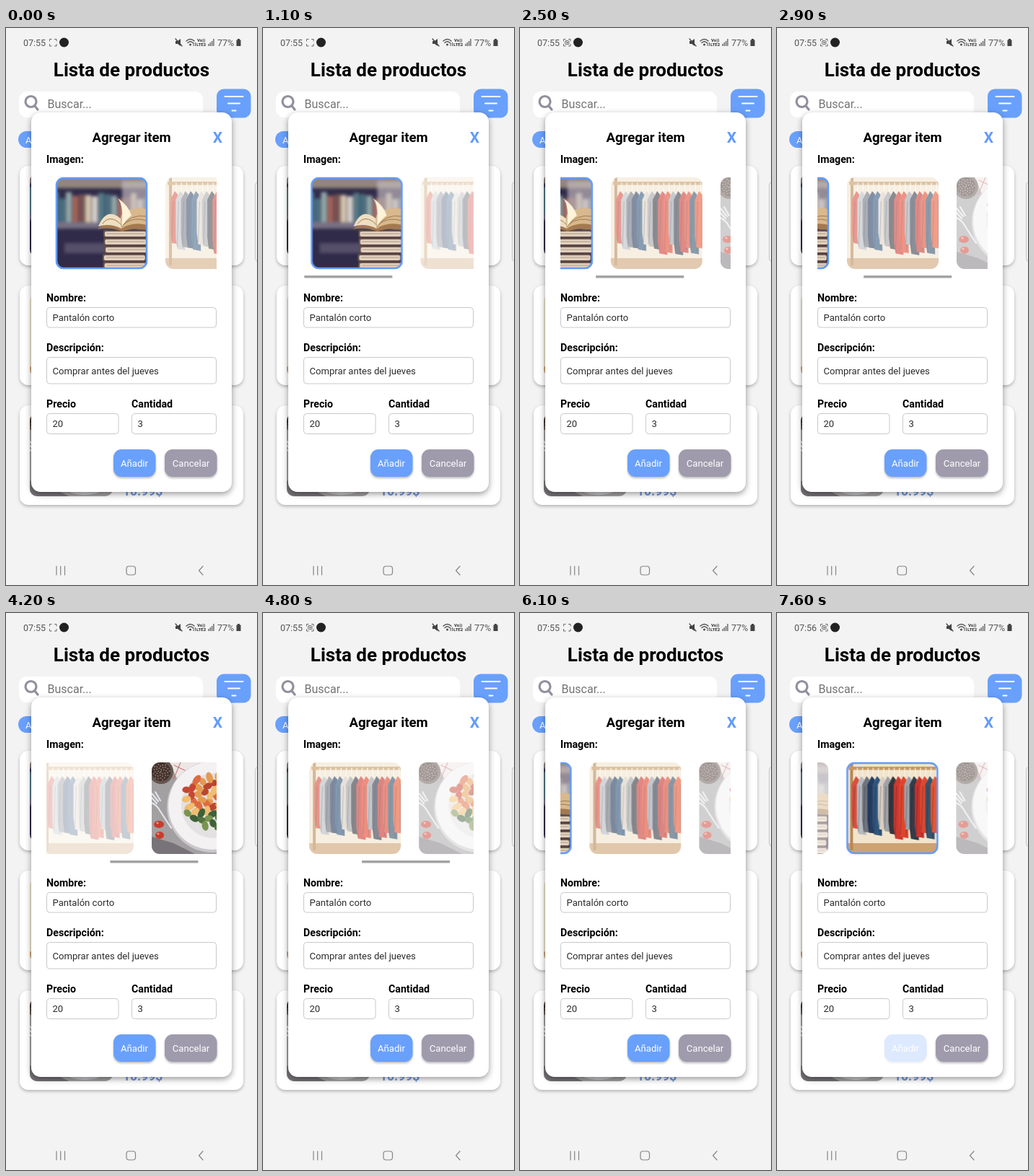
Recreate the animation shown at these times as an HTML page. Size 348x772 px, loop 8000 ms.

```html
<!DOCTYPE html>
<html lang="es">
<head>
<meta charset="utf-8">
<title>Lista de productos</title>
<style>
@property --scroll { syntax: '<number>'; inherits: true; initial-value: 0; }
html, body { margin: 0; width: 100%; height: 100%; overflow: hidden; background: #f3f3f3; }
svg { display: block; }
#stage { width: 100vw; height: 100vh; }
text { font-family: Roboto, sans-serif; font-size: 13.1px; fill: #2b2b2b; }
.label { font-size: 14.2px; font-weight: 700; fill: #000; }
.light { fill: #fff; }
.middle { text-anchor: middle; }
.field { fill: #fff; stroke: #c9c9c9; }
.card { fill: #fff; filter: drop-shadow(0 2px 2px #0004); }
.modal { fill: #fff; filter: drop-shadow(0 3px 4px #0006); }
.raised { filter: drop-shadow(0 2px 1.5px #0004); }
.line { fill: none; stroke-linecap: round; stroke-linejoin: round; }
.ring { fill: none; stroke: #629bfa; stroke-width: 2.6; }

#carousel, #track, #thumb, #books, #clothes, #food, #add, .ring { animation: 8s linear infinite; }
#carousel { animation-name: scroll; }
#track { transform: translateX(calc(var(--scroll) * -1px)); }
#thumb { transform: translateX(calc(var(--scroll) * .517px)); animation-name: thumb; }
#books { animation-name: books; }
#clothes { animation-name: clothes; }
#food { animation-name: food; }
#add { animation-name: press; }
#books .ring { animation-name: deselect; }
#clothes .ring { animation-name: select; }

@keyframes scroll {
  0%, 6.25% { --scroll: 0; animation-timing-function: ease-in-out; }
  10% { --scroll: 60; animation-timing-function: ease-in-out; }
  14.4%, 26.25% { --scroll: 0; }
  31.25% { --scroll: 95; animation-timing-function: ease-out; }
  35.6%, 38.1% { --scroll: 124; animation-timing-function: ease-out; }
  43.75%, 51.25% { --scroll: 221; }
  52.5% { --scroll: 171; }
  60% { --scroll: 157; animation-timing-function: ease-out; }
  65.6%, 100% { --scroll: 124.6; }
}
@keyframes thumb {
  0%, 6.25% { opacity: 0; }
  7%, 14% { opacity: 1; }
  16.25%, 25.6% { opacity: 0; }
  26.8%, 44.4% { opacity: 1; }
  46.25%, 51.25% { opacity: 0; }
  51.9%, 70.6% { opacity: 1; }
  73.75%, 100% { opacity: 0; }
}
@keyframes books {
  0%, 24.5% { opacity: 1; }
  25%, 26.5% { opacity: .22; }
  29.5%, 82.5% { opacity: 1; }
  83.7%, 100% { opacity: .5; }
}
@keyframes clothes {
  0%, 6.2% { opacity: .52; }
  7.5%, 13% { opacity: .22; }
  18.75%, 25.3% { opacity: 1; }
  29%, 51% { opacity: .58; }
  52%, 53.5% { opacity: .28; }
  57%, 80.5% { opacity: .6; }
  82%, 83.75% { opacity: .22; }
  88%, 100% { opacity: 1; }
}
@keyframes food {
  0%, 38% { opacity: .5; }
  39.5%, 41% { opacity: .22; }
  45.5%, 53% { opacity: 1; }
  57%, 100% { opacity: .5; }
}
@keyframes press { 0%, 92.4% { opacity: 1; } 92.5%, 100% { opacity: .22; } }
@keyframes deselect { 0%, 83.7% { opacity: 1; } 83.75%, 100% { opacity: 0; } }
@keyframes select { 0%, 83.7% { opacity: 0; } 83.75%, 100% { opacity: 1; } }
</style>
</head>
<body>
<svg id="stage" viewBox="0 0 348 772">
  <defs>
    <filter id="blur"><feGaussianBlur stdDeviation="2"/></filter>
    <clipPath id="tile"><rect width="127" height="127" rx="11"/></clipPath>

    <g id="booksArt" clip-path="url(#tile)">
      <rect width="127" height="127" fill="#302b49"/>
      <g filter="url(#blur)">
        <rect x="-5" y="-5" width="140" height="20" fill="#91857c"/>
        <g id="shelf"></g>
        <rect x="-5" y="62" width="140" height="9" fill="#777184"/>
        <rect x="12" y="91" width="58" height="14" fill="#555069"/>
        <rect x="92" y="5" width="40" height="50" fill="#c7bec0" opacity=".65"/>
      </g>
      <g id="stack"></g>
      <path d="M58 72Q72 58 91 67Q105 56 127 66V73Q106 69 92 75Q74 68 58 72Z" fill="#a47950"/>
      <path d="M59 68Q72 36 96 63L91 71Q75 63 59 68Z" fill="#efdfc2"/>
      <path d="M91 71Q85 47 103 45Q120 39 127 46V66Q106 61 91 71Z" fill="#d8b88d"/>
      <path d="M91 70Q95 40 86 29Q101 39 105 53Q99 56 91 70Z" fill="#fff3d9"/>
      <path class="line" d="M65 64Q76 50 91 66M91 69Q103 50 126 54M94 65Q107 54 126 60" stroke="#9f794f"/>
    </g>

    <g id="clothesArt" clip-path="url(#tile)">
      <rect width="127" height="127" fill="#f1e4cd"/>
      <rect y="112" width="127" height="15" fill="#cda274"/>
      <rect x="5" width="4" height="122" fill="#b98852"/>
      <rect x="3" y="6" width="124" height="4.5" fill="#c69860"/>
      <g id="rack"></g>
    </g>

    <g id="foodArt" clip-path="url(#tile)">
      <rect width="127" height="127" fill="#a3a0a2"/>
      <path d="M0 127V103L30 112L60 127Z" fill="#777378"/>
      <path d="M25 0H80L36 25Z" fill="#ece6e4"/>
      <path class="line" d="M31 4L54 15M40 0L30 24M65 2L42 17" stroke="#c46568"/>
      <circle cx="13" cy="13" r="17" fill="#66564f"/>
      <circle cx="13" cy="13" r="13" fill="#40322e"/>
      <g id="pepper"></g>
      <circle cx="84" cy="62" r="63" fill="#c9c7cb"/>
      <circle cx="84" cy="60" r="61" fill="#f3f1f2"/>
      <circle cx="86" cy="60" r="45" fill="#e4e1e2"/>
      <path class="line" d="M-3 55Q7 58 12 68L27 91M0 43L9 54M0 49L7 57M5 41L12 53" stroke="#e8e8ed" stroke-width="2"/>
      <g id="salad"></g>
      <g fill="#c93b2d"><ellipse cx="10" cy="86" rx="7" ry="5"/><ellipse cx="11" cy="101" rx="6" ry="5"/></g>
      <g fill="#f49b82"><circle cx="8" cy="84" r="1.5"/><circle cx="9" cy="99" r="1.5"/></g>
    </g>
  </defs>

  <rect width="348" height="772" fill="#f3f3f3"/>

  <!-- status bar -->
  <text id="clock" x="24" y="24.5" style="font-size:12.5px;fill:#555">07:55</text>
  <g class="line" stroke="#666">
    <path d="M60.500 18V15.500H63M67.500 15.500H70V18M70 22.500V25H67.500M63 25H60.500V22.500"/>
    <g id="dot"><rect x="62.700" y="17.700" width="5.200" height="5" rx="1"/><circle cx="65.300" cy="20.200" r=".8"/></g>
  </g>
  <circle cx="80.500" cy="20" r="6.500" fill="#222"/>
  <path d="M235 18H238L242 15V25L238 22H235Z" fill="#444"/>
  <path class="line" d="M235 15L244 25" stroke="#444" stroke-width="1.300"/>
  <path class="line" d="M250 18Q255.500 13 261 18M252 20.500Q255.500 17 259 20.500" stroke="#555" stroke-width="1.500"/>
  <circle cx="255.500" cy="23" r="1.600" fill="#555"/>
  <path d="M260 20V25M262.500 20V25" stroke="#555"/>
  <text x="265" y="19" style="font-size:6px;font-weight:700">Vo))</text>
  <text x="264" y="25.200" style="font-size:6px;font-weight:700">LTE2</text>
  <path d="M281 25V22M283.300 25V20M285.600 25V18M287.900 25V15" stroke="#666" stroke-width="1.400"/>
  <text x="293" y="24.500" style="font-size:12.500px;fill:#555">77%</text>
  <path d="M319.500 16.500H321V15H324V16.500H325.500V25H319.500Z" fill="#444"/>

  <!-- product list -->
  <text class="middle" x="174" y="67" style="font-size:26px;font-weight:700;fill:#000">Lista de productos</text>
  <rect x="18" y="88" width="255" height="36" rx="11" fill="#fff"/>
  <g class="line" stroke="#92909d" stroke-width="3.200"><circle cx="34.500" cy="102" r="7.500"/><path d="M40 108L44 113"/></g>
  <text x="57.500" y="111" style="font-size:16px;fill:#737373">Buscar...</text>
  <rect x="292" y="84.500" width="47.500" height="40" rx="10" fill="#69a0fc"/>
  <path class="line" d="M303.500 95H328.500M308 104.500H324M313.500 114.500H318.500" stroke="#fff" stroke-width="2"/>
  <rect x="17" y="143" width="60" height="23" rx="11.500" fill="#69a0fc"/>
  <text class="light" x="27" y="159.500">A</text>
  <rect x="345.500" y="213.500" width="12" height="110" rx="4" fill="#f0f0f0" stroke="#c6c6c6"/>
  <g class="card">
    <rect x="19" y="191" width="310" height="138" rx="12"/>
    <rect x="19" y="357" width="310" height="138" rx="12"/>
    <rect x="19" y="523" width="310" height="138" rx="12"/>
  </g>
  <use href="#booksArt" transform="translate(33 202) scale(.905)"/>
  <use href="#clothesArt" transform="translate(33 368) scale(.905)"/>
  <use href="#foodArt" transform="translate(33 534) scale(.905)"/>
  <text x="162" y="647.500" style="font-size:17.500px;font-weight:700;fill:#7198e6">10.99$</text>

  <!-- dialog -->
  <rect class="modal" x="35" y="117" width="278" height="526" rx="13"/>
  <text class="middle" x="174" y="158" style="font-size:18.600px;font-weight:700;fill:#000">Agregar item</text>
  <text class="middle" x="293.500" y="159" style="font-size:21px;font-weight:700;fill:#629bfa">X</text>
  <text class="label" x="56" y="187">Imagen:</text>

  <svg id="carousel" x="56" y="206" width="236" height="144" overflow="hidden">
    <g id="track">
      <g transform="translate(13 1)"><g id="books"><use href="#booksArt"/><rect class="ring" x="1" y="1" width="125" height="125" rx="10"/></g></g>
      <g transform="translate(165 1)"><g id="clothes"><use href="#clothesArt"/><rect class="ring" x="1" y="1" width="125" height="125" rx="10"/></g></g>
      <g transform="translate(317 1)"><g id="food"><use href="#foodArt"/></g></g>
    </g>
    <rect id="thumb" y="137" width="122" height="3.500" fill="#a4a4a4"/>
  </svg>

  <text class="label" x="56" y="379">Nombre:</text>
  <rect class="field" x="56.500" y="387.500" width="235" height="27.500" rx="4"/>
  <text x="64.500" y="406">Pantalón corto</text>
  <text class="label" x="56" y="448">Descripción:</text>
  <rect class="field" x="56.500" y="456.500" width="235" height="36.500" rx="4"/>
  <text x="64.500" y="480">Comprar antes del jueves</text>
  <text class="label" x="56" y="526">Precio</text>
  <rect class="field" x="56.500" y="534.500" width="99.500" height="28" rx="4"/>
  <text x="64.500" y="553">20</text>
  <text class="label" x="174" y="526">Cantidad</text>
  <rect class="field" x="174.500" y="534.500" width="117" height="28" rx="4"/>
  <text x="182.500" y="553">3</text>
  <g id="add">
    <rect class="raised" x="149" y="584" width="58.500" height="38" rx="11" fill="#69a0fc"/>
    <text class="light middle" x="178" y="608">Añadir</text>
  </g>
  <rect class="raised" x="220" y="584" width="72.500" height="38" rx="11" fill="#9f9bac"/>
  <text class="light middle" x="256.500" y="608">Cancelar</text>

  <!-- navigation bar -->
  <g class="line" stroke="#858585" stroke-width="1.200">
    <path d="M70 746V758M75.700 746V758M81.500 746V758"/>
    <rect x="167" y="746" width="12.500" height="12" rx="3.500"/>
    <path d="M273 746L267.500 752L273 758"/>
  </g>
</svg>

<script>
const $ = id => document.getElementById(id);
const fill = (id, items, draw) => { $(id).innerHTML = items.map(draw).join(''); };
const range = n => [...Array(n).keys()];

// Repeatable noise in 0..1
const noise = n => { const v = Math.sin(n * 12.9898) * 43758.5453; return v - Math.floor(v); };

const spines = ['#557b87', '#d8c8ad', '#a56459', '#496f82', '#d7d1cd', '#79524f', '#92a8a8'];
fill('shelf', range(15), i =>
  `<rect x="${i * 9 - 4}" y="${20 + noise(i) * 10}" width="8" height="42" fill="${spines[i * 3 % 7]}"/>`);

fill('stack', range(5), i => {
  const x = 64 + noise(i + 4) * 5, y = 73 + i * 11;
  return `<rect x="${x}" y="${y}" width="59" height="10.5" rx="2" fill="#685148"/>
    <rect x="${x + 2}" y="${y + 2}" width="57" height="7" rx="2" fill="#dfd0bd"/>
    <path d="M${x + 5} ${y + 5}h52" stroke="#b69d88"/>`;
});

const fabrics = ['#d84f3e', '#b8bbc0', '#70747d', '#263d61', '#30557c', '#d9cec0', '#a1a2a5', '#34363d',
  '#cf3930', '#e2442c', '#9da1a8', '#343b49', '#c8342d', '#dc482f', '#38536b', '#e75531'];
fill('rack', fabrics, (color, i) => {
  const x = 10 + i * 7.3, end = 92 + noise(i + 2) * 16;
  return `<path class="line" d="M${x} 26L${x + 5} 17V8" stroke="#f8f3e8" stroke-width="1.3"/>
    <path d="M${x + 3} 19L${x + 9} 26L${x + 10} ${end}L${x - 1} ${end - 2}L${x - 3} ${end - 18}L${x - 3} 31Z" fill="${color}"/>
    <path d="M${x + 1} 33L${x - 1} ${end - 5}M${x + 7} 30V${end - 3}" stroke="#1b2030" opacity=".35"/>`;
});

fill('pepper', range(36), i => {
  const a = i * 2.4, r = Math.sqrt(i) * 2;
  return `<circle cx="${13 + r * Math.cos(a)}" cy="${13 + r * Math.sin(a)}" r="1" fill="#97796a"/>`;
});

const salad = ['#e49a50', '#dd6c40', '#f0bd71', '#b9472e'];
const leaves = ['#54743d', '#78944e', '#3f6138'];
fill('salad', range(48), i => {
  const a = i * 2.4, r = Math.sqrt(i) * 5.2;
  const x = 80 + r * Math.cos(a), y = 54 + r * Math.sin(a) * 1.05;
  const color = y > 70 ? leaves[i % 3] : x < 58 && y < 50 ? '#c64732' : salad[i % 4];
  return `<ellipse cx="${x}" cy="${y}" rx="${5 + noise(i) * 3}" ry="4.5" fill="${color}"
    transform="rotate(${i * 47} ${x} ${y})"/>`;
});

const LOOP = 8000, BLINK = 512, FIRST_BLINK = 432, NEXT_MINUTE = 6300;
let start;
function tick(now) {
  start ??= now;
  const t = (now - start) % LOOP;
  const dotOn = (Math.floor((t - FIRST_BLINK) / BLINK) & 1) === 0;
  $('dot').style.visibility = dotOn ? 'visible' : 'hidden';
  $('clock').textContent = t < NEXT_MINUTE ? '07:55' : '07:56';
  requestAnimationFrame(tick);
}
requestAnimationFrame(tick);
</script>
</body>
</html>
```
